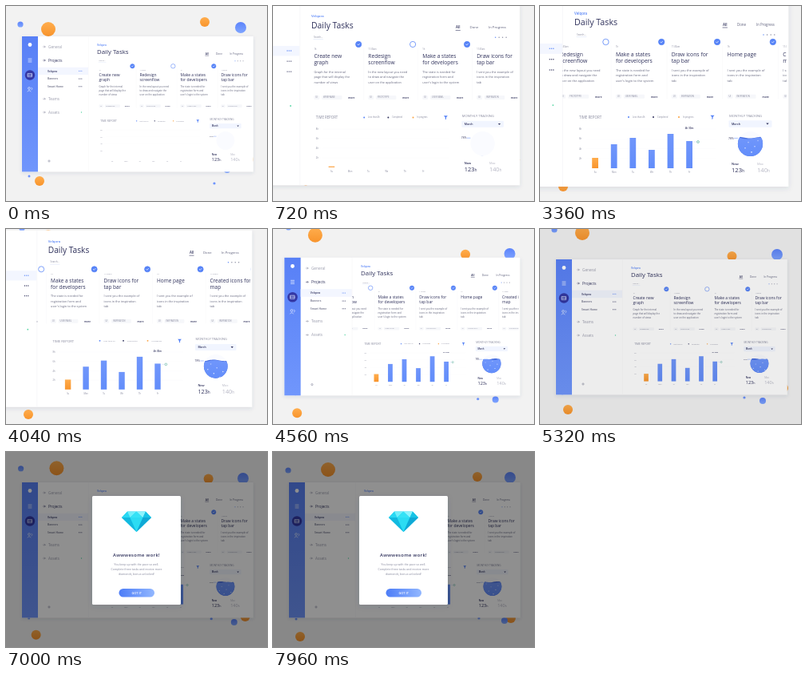
Animation, 327 px wide and 244 px high, one loop 8000 ms. Source, as an HTML page:

```html
<!DOCTYPE html>
<html lang="en">
<head>
<meta charset="utf-8">
<title>Daily Tasks</title>
<style>
html, body { margin: 0; width: 100%; height: 100%; overflow: hidden; background: #f2f2f2; }
svg { display: block; width: 100vw; height: 100vh; font-family: "Open Sans", "Noto Sans", sans-serif; }
</style>
</head>
<body>
<svg id="stage" viewBox="0 0 327 244"></svg>
<script>
const LOOP = 8000, COL = 69.8;
const WIDE = { x: 82.6, y: 42.4, scale: .73 };
const INK = '#30325c', GREY = '#85879c', PALE = '#b4b5c3', BLUE = '#5683f7', ORANGE = '#fba03c';

const clamp = v => Math.max(0, Math.min(1, v));
const span = (t, a, b) => clamp((t - a) / (b - a));
const quad = v => v < .5 ? 2 * v * v : 1 - 2 * (1 - v) ** 2;
const cubic = v => v < .5 ? 4 * v ** 3 : 1 - 4 * (1 - v) ** 3;
const easeOut = v => 1 - (1 - v) ** 3;
const backOut = v => 1 + 2.4 * (v - 1) ** 3 + 1.4 * (v - 1) ** 2;

const text = (x, y, size, str, fill = INK, extra = '') =>
  `<text x="${x}" y="${y}" font-size="${size}" fill="${fill}" ${extra}>${str}</text>`;
const rect = (x, y, w, h, fill, extra = '') =>
  `<rect x="${x}" y="${y}" width="${w}" height="${h}" fill="${fill}" ${extra}/>`;
const dot = (x, y, r, fill, extra = '') =>
  `<circle cx="${x}" cy="${y}" r="${r}" fill="${fill}" ${extra}/>`;
const line = (d, stroke, w = .6) =>
  `<path d="${d}" fill="none" stroke="${stroke}" stroke-width="${w}" stroke-linecap="round"/>`;
const gradient = (id, from, to, dir = '') =>
  `<linearGradient id="${id}" ${dir}><stop stop-color="${from}"/><stop offset="1" stop-color="${to}"/></linearGradient>`;
const bold = 'font-weight="600"', middle = 'text-anchor="middle"';

// Floating balls: radius, colour, keys of [time, x, y]
const balls = [
  [9, 'o', [[0, 53, 29], [5320, 53, 5], [5960, 54, 15], [7960, 69, 22]]],
  [6, 'o', [[0, 249, 20], [5320, 240.5, 34], [5960, 248, 37], [7960, 256, 31]]],
  [7, 'b', [[0, 294, 27], [5320, 297, 32], [5960, 297, 34], [7960, 297, 32]]],
  [3.6, 'b', [[0, 18, 23], [4040, 20, -1], [5320, 18, 1], [5960, 18, 14], [7960, 19, 23]]],
  [6, 'o', [[0, 42, 219], [2120, 36, 218], [3360, 29, 226], [4040, 28, 232],
            [5320, 35, 226], [5960, 42, 225], [7960, 34, 231]]],
  [6, 'o', [[0, 304, 192], [4040, 294, 196], [5320, 305, 199], [5960, 303, 202], [7960, 298, 208]]],
  [4, 'b', [[0, 277, 205], [5320, 279, 215], [5960, 279, 216], [7960, 290, 211]]],
  [1.6, 'b', [[0, 261, 222], [5320, 256, 211], [5960, 256, 210], [7960, 258, 208]]],
  [1.5, 'b', [[0, 29, 213], [5320, 28, 206], [7960, 29, 209]]]
];

function along(keys, t) {
  let i = 0;
  while (i < keys.length - 2 && t > keys[i + 1][0]) i++;
  const a = keys[i], b = keys[i + 1], d = b[0] - a[0], u = span(t, a[0], b[0]);
  const slope = (j, c) => keys[j - 1] && keys[j + 1]
    ? (keys[j + 1][c] - keys[j - 1][c]) / (keys[j + 1][0] - keys[j - 1][0]) : 0;
  return [1, 2].map(c => a[c] + (b[c] - a[c]) * u * u * (3 - 2 * u)
    + d * u * (1 - u) * (slope(i, c) * (1 - u) - slope(i + 1, c) * u));
}

const sample = 'I sent you the example of|icons in the inspiration|tab';
const tasks = [
  ['Create new|graph', 'Graph for the internal|page that will display the|number of views', 'WIREFRAME'],
  ['Redesign|screenflow', 'In the new layout you need|to draw and navigate the|user on the application', 'PROTOTYPE'],
  ['Make a states|for developers', "The state is needed for|registration form and|user's login to the system", 'USER PANEL'],
  ['Draw icons for|tap bar', sample, 'INSPIRATION'],
  ['Home page', sample, 'INSPIRATION'],
  ['Created icons for|map', sample, 'INSPIRATION']
];

function task([title, body, tag], i) {
  const x = 46.5 + i * COL, cx = x + 57.3, done = i !== 1;
  return text(x, 52.3, 2.6, i % 2 ? '11:30am' : '1h', GREY)
    + dot(cx, 45, 3.7, done ? BLUE : '#fff', `stroke="${BLUE}" stroke-width=".8"`)
    + (done ? line(`M${cx - 1.4} 45l1 1.1 1.8-2`, '#fff', .7) : '')
    + title.split('|').map((s, k) => text(x, 62.8 + k * 7.8, 6.8, s, INK, 'font-weight="500"')).join('')
    + body.split('|').map((s, k) => text(x, 81.6 + k * 6.7, 4, s, '#66687f')).join('')
    + rect(x, 110.8, 7, 5, '#f6f7fa', 'rx="1"') + text(x + 2, 114.3, 2.7, 'UI', GREY)
    + rect(x + 10, 110.8, 26, 5, '#f6f7fa', 'rx="1"') + text(x + 12, 114.3, 2.7, tag, GREY)
    + text(x + 44, 114.6, 3.3, 'more', INK, bold)
    + line(`M${x + 64} 50V116`, '#f6f6f9', .5);
}

// Sidebar and menu, laid out in wide view coordinates
function menu() {
  const head = (y, s, on) => line(`M46.6 ${y - 1.6}h2.6m-1.1-1.1l1.1 1.1-1.1 1.1`, on ? INK : GREY, .5)
    + text(53, y, 4.7, s, on ? INK : '#9b9cad', on ? 'font-weight="500"' : '');
  const item = (y, s, on) => text(52, y, 3.3, s, on ? INK : '#686a83', bold)
    + [0, 1, 2].map(k => dot(91.5 + k * 1.7, y - 1.2, .5, on ? BLUE : INK)).join('');
  return rect(20, 38, 20, 169.4, 'url(#side)')
    + dot(30, 48.5, 2.4, '#fff')
    + line('M28 66h4m-4 2h4m-4 2h4', '#dfe8ff', .8)
    + dot(30, 86.5, 6.2, '#3438a5')
    + line('M27.5 84.5h5v4h-5zM27.5 86.5h5', '#dfe8ff', .7)
    + dot(29, 103, 1.4, 'none', 'stroke="#dfe8ff" stroke-width=".7"')
    + line('M27 107q2-3 4 0m1-5q2 1 0 3', '#dfe8ff', .7)
    + rect(40, 76.7, 63, 9.4, '#f3f6ff')
    + head(52.6, 'General') + head(69.6, 'Projects', true)
    + item(82.5, 'Velqora', true) + item(92.3, 'Banners') + item(102, 'Smart Home')
    + head(117.8, 'Teams') + head(134.6, 'Assets')
    + dot(94.5, 133, .7, '#57d6a4') + dot(54, 194, 1.1, 'none', `stroke="${GREY}" stroke-width=".6"`)
    + line('M103.3 38V207', '#f4f4f7', .5);
}

const heights = [13, 30, 38, 23, 43, 34];
const days = ['Su', 'Mon', 'Tu', 'We', 'Th', 'Fr'];
const barX = i => 65.2 + i * 23.6;

function chart() {
  const legend = [[111, BLUE, 'Less than 4h'], [142, INK, 'Completed'], [174, ORANGE, 'In progress']];
  return text(49, 141, 4.5, 'TIME REPORT', GREY)
    + legend.map(([x, c, s]) => dot(x, 139, 1, c) + text(x + 5, 140, 2.6, s, GREY)).join('')
    + `<path d="M213.5 136.8h5l-1.9 2.3v2l-1.2.8v-2.8z" fill="${BLUE}"/>`
    + ['8h', '6h', '4h', '2h'].map((s, i) => text(49, 155 + i * 12.3, 2.8, s, GREY)
      + line(`M58 ${154 + i * 12.3}H220`, '#fafafc', .4)).join('')
    + days.map((s, i) => text(barX(i) + 4, 209, 2.7, s, GREY, middle)).join('')
    + heights.map((h, i) => `<rect class="bar" x="${barX(i)}" width="7.8" fill="url(#${i ? 'bar' : 'o'})"/>`).join('')
    + `<g id="tip">${text(187, 154.3, 3, '4h 30m', INK, bold + ' ' + middle)}</g>`
    + `<g id="mark">${line('M193 170h3', '#c5d3fb', .5)}${dot(198, 170, 1.4, '#fff', 'stroke="#6fb9a8" stroke-width=".8"')}</g>`;
}

function tracking() {
  return text(237, 138.5, 4.2, 'MONTHLY TRACKING', GREY)
    + rect(236.5, 143.3, 54, 8.4, '#f1f5ff', 'rx="1"')
    + text(240, 149, 3.6, 'March', INK, bold)
    + `<path d="M283.3 146.6h3.4l-1.7 2z" fill="${INK}"/>`
    + dot(263.5, 172.5, 15.6, '#fafbff')
    + '<g clip-path="url(#bowl)"><path id="back" fill="#4a70e0"/><path id="water" fill="url(#bar)"/>'
    + [0, 1, 2, 3, 4, 5].map(() => '<circle class="bubble" r=".8" fill="#fff"/>').join('') + '</g>'
    + text(236, 166.5, 3.4, '78%', INK) + line('M243.5 165.4h4', BLUE, .5)
    + text(240, 198.7, 4, 'Now', INK, bold) + text(272, 198.7, 4, 'Max', PALE)
    + text(240, 208.2, 7.6, '123<tspan font-size="5">h</tspan>', INK, 'font-weight="500"')
    + text(272, 208.2, 7.6, '140<tspan font-size="5">h</tspan>', PALE);
}

function board() {
  return rect(-85.8, -6, 397, 232, '#fff', 'filter="url(#soft)"')
    + `<g transform="scale(${1 / WIDE.scale}) translate(${-WIDE.x} ${-WIDE.y})">${menu()}</g>`
    + text(43, 10.5, 4.4, 'Velqora', BLUE, bold)
    + text(43, 24, 10.7, 'Daily Tasks', INK, 'font-weight="500"')
    + text(229, 25, 4.6, 'All', INK, bold) + line('M229 27h5.5', INK, .6)
    + text(247, 25, 4.4, 'Done', '#5d5f7b') + text(271, 25, 4.4, 'In Progress', '#5d5f7b')
    + text(46, 36.6, 3, 'Search...', GREY) + line('M46 38.6h12', '#c9d4f5', .4)
    + [0, 1, 2, 3].map(k => dot(280 + k * 4.6, 36, .7, k ? GREY : BLUE)).join('')
    + `<g clip-path="url(#lane)"><g id="tasks">${tasks.map(task).join('')}</g></g>`
    + chart() + tracking();
}

function modal() {
  const lines = ['You keep up with the pace so well.', 'Complete three tasks and receive more', 'diamonds, bonus unlocked!'];
  const facet = (d, c) => `<path d="${d}" fill="${c}"/>`;
  return rect(108, 55, 111, 136, '#fff', 'rx="1.5" filter="url(#soft)"')
    + '<g id="gem">'
    + facet('M-18.5-4.5L-11.5-12H11.5L18.5-4.5 0 13.5z', '#16cdec')
    + facet('M-18.5-4.5L-11.5-12-8-4.5z', '#28d8f3') + facet('M-11.5-12H0L-8-4.5z', '#72effb')
    + facet('M0-12L-8-4.5H8z', '#35e2f6') + facet('M0-12H11.5L8-4.5z', '#8df4fd')
    + facet('M11.5-12L18.5-4.5H8z', '#17c3e6') + facet('M-18.5-4.5H-8L0 13.5z', '#12b9e0')
    + facet('M-8-4.5H8L0 13.5z', '#2cdcf3') + facet('M8-4.5H18.5L0 13.5z', '#0fa9d6')
    + '</g>'
    + text(163.5, 131, 5.8, 'Awwwesome work!', INK, bold + ' letter-spacing=".35" ' + middle)
    + lines.map((s, i) => text(163.5, 142 + i * 6.2, 3.5, s, GREY, middle)).join('')
    + rect(141.5, 171, 44.5, 10.6, 'url(#button)', 'rx="5.3"')
    + text(163.7, 177.7, 3.9, 'GOT IT', '#fff', bold + ' ' + middle);
}

const stage = document.getElementById('stage');
const down = 'x1="0" y1="0" x2="0" y2="1"';
stage.innerHTML = '<defs>'
  + gradient('o', '#ffad4d', '#f8942c', down) + gradient('b', '#5d84fb', '#7fa5ff', down)
  + gradient('bar', '#7096fb', '#628dfa', down) + gradient('side', '#5880f6', '#7096fc', down)
  + gradient('button', '#4d7df7', '#92b7ff')
  + '<filter id="soft" x="-10%" y="-10%" width="120%" height="120%"><feDropShadow dx="0" dy="2" stdDeviation="3" flood-color="#3a4068" flood-opacity=".13"/></filter>'
  + `<clipPath id="lane">${rect(28.3, 40, 280.7, 80, '#000')}</clipPath>`
  + `<clipPath id="bowl">${dot(263.5, 172.5, 15.6, '#000')}</clipPath></defs>`
  + rect(0, 0, 327, 244, '#f2f2f2')
  + balls.map(([r, c]) => `<circle class="ball" r="${r}" fill="url(#${c})"/>`).join('')
  + `<g id="board">${board()}</g>`
  + rect(0, 0, 327, 244, '#000', 'id="shade"')
  + `<g id="modal">${modal()}</g>`;

const all = c => [...stage.querySelectorAll(c)];
const set = (el, attrs) => { for (const k in attrs) el.setAttribute(k, attrs[k]); };
const part = {};
for (const id of ['board', 'tasks', 'tip', 'mark', 'back', 'water', 'shade', 'modal', 'gem'])
  part[id] = document.getElementById(id);
const ballEls = all('.ball'), barEls = all('.bar'), bubbleEls = all('.bubble');

function wave(level, phase) {
  let d = 'M246 190';
  for (let x = 246; x <= 281; x += 1.5) d += `L${x} ${(level + .9 * Math.sin(x / 4.5 + phase)).toFixed(2)}`;
  return d + 'V190z';
}

function draw(t) {
  ballEls.forEach((el, i) => {
    const [cx, cy] = along(balls[i][2], t);
    set(el, { cx, cy });
  });

  // Camera: 1 shows the whole board, 0 is zoomed in
  const out = 1 - cubic(span(t, 40, 1000)) + cubic(span(t, 3600, 4850));
  const scale = 1 - (1 - WIDE.scale) * out;
  set(part.board, { transform: `translate(${WIDE.x * out ** 1.12} ${WIDE.y * out}) scale(${scale})` });

  const scroll = quad(span(t, 2900, 3690)) - quad(span(t, 4350, 5050));
  set(part.tasks, { transform: `translate(${-2 * COL * scroll} 0)` });

  barEls.forEach((el, i) => {
    const height = heights[i] * easeOut(span(t, 700 + i * 90, 1350 + i * 90));
    set(el, { y: 203 - height, height });
  });
  set(part.mark, { opacity: span(t, 1800, 2000) });
  set(part.tip, { opacity: span(t, 2300, 2500) });

  const level = 190 - 24.5 * easeOut(span(t, 800, 1800));
  set(part.back, { d: wave(level - .8, -t / 260) });
  set(part.water, { d: wave(level, t / 260) });
  bubbleEls.forEach((el, i) => {
    const rise = (t / 1600 + i * .37) % 1;
    set(el, { cx: 253 + i * 4, cy: 187 - (185 - level) * rise, opacity: level < 180 ? 1 - rise * .6 : 0 });
  });

  set(part.shade, { opacity: .44 * quad(span(t, 5150, 5750)) });
  const pop = easeOut(span(t, 5450, 5880));
  set(part.modal, { opacity: pop, transform: `translate(0 ${14 * (1 - pop)})` });
  const size = t < 6050 ? 0 : Math.max(0, backOut(span(t, 6050, 6600)));
  set(part.gem, { transform: `translate(163.5 86.5) scale(${size})` });
}

const start = performance.now();
function tick() {
  draw((performance.now() - start) % LOOP);
  requestAnimationFrame(tick);
}
tick();
</script>
</body>
</html>
```
